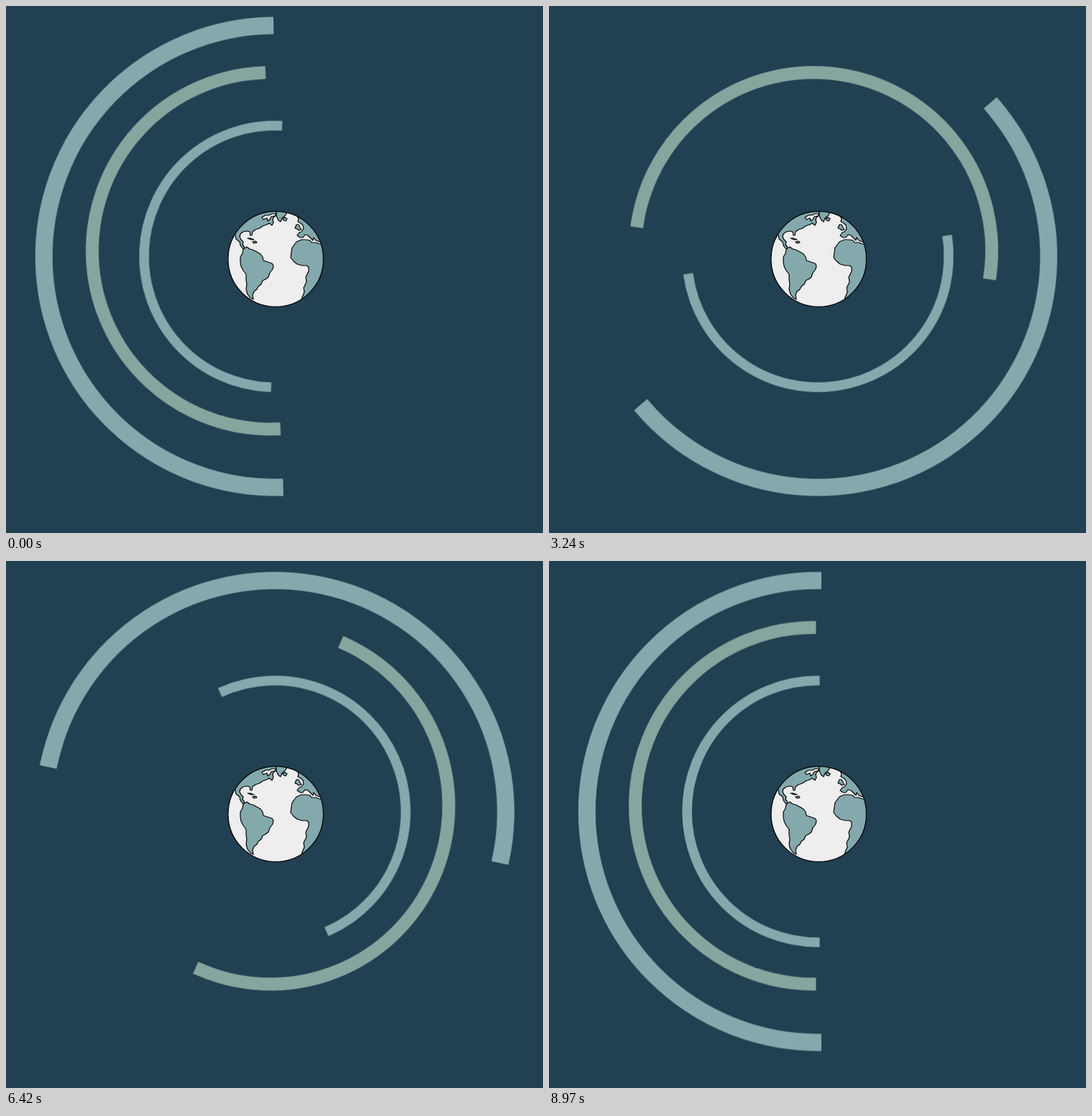
These frames come from a looping animation (747 by 733 pixels, 9 s). An HTML page:

```html
<!DOCTYPE html>
<html lang="en">
<head>
<meta charset="utf-8">
<title>Globe with orbiting arcs</title>
<style>
  html, body { margin: 0; width: 100%; height: 100%; overflow: hidden; background: #214051; }
  svg { display: block; width: 747px; height: 733px; }
  .arc { fill: none; stroke: #83a9ad; transform-origin: 0 0; }
  /* 30 ms ticks; the delay puts the first tick at time zero */
  .outer { stroke-width: 24; animation: ccw 9s steps(300) -32ms infinite; }
  .middle { stroke: #86a59f; stroke-width: 18; animation: ccw2 9s steps(300) -32ms infinite; }
  .inner { stroke-width: 13.5; animation: cw2 9s steps(300) -32ms infinite; }
  @keyframes ccw { to { transform: rotate(-360deg); } }
  @keyframes ccw2 { to { transform: rotate(-720deg); } }
  @keyframes cw2 { to { transform: rotate(720deg); } }
  .sea { fill: #eee; }
  .land { fill: #83a9ad; stroke: #000; stroke-width: 1.2; stroke-linejoin: round; }
  .lake { fill: #eee; }
  .rim { fill: none; stroke: #000; stroke-width: 1.3; }
</style>
</head>
<body>
<svg viewBox="0 0 747 733">
  <defs>
    <clipPath id="disc"><circle cx="375.2" cy="352" r="66.3"/></clipPath>
  </defs>

  <g transform="translate(373.9 348.4)">
    <path class="arc outer" d="M5-321.2H0A321.2 321.2 0 0 0 0 321.2H5"/>
  </g>
  <g transform="translate(367.9 340.5)">
    <path class="arc middle" d="M3.5-248H0A248 248 0 0 0 0 248H3.5"/>
  </g>
  <g transform="translate(374 348.3)">
    <path class="arc inner" d="M2.5-182H0A182 182 0 0 0 0 182H2.5"/>
  </g>

  <circle class="sea" cx="375.2" cy="352" r="66.3"/>
  <g class="land" clip-path="url(#disc)">
    <!-- North and Central America -->
    <path d="M376 280L340 284L312 312L319 318L320 324L325 328L326 333L329 337L332 338L331 334L329 332L330 328L327 325L325 321L326 317L330 314L335 313L339 314L340 319L342 319L343 314L347 311L353 309L357 306L363 304L366 302L370 305L372 301L371 297L372 294L376 291Z"/>
    <path class="lake" d="M356 294L361 291L366 291L370 289L376 289L374 292L369 293L367 297L364 299L363 295L358 297Z"/>
    <!-- Greenland and Iceland -->
    <path d="M376 282L376 292L379 298L382 300L384 295L388 292L391 287L391 282Z"/>
    <path d="M385 296L388 294L391 296L389 299L386 298Z"/>
    <!-- Caribbean islands -->
    <path d="M336 323L340 323L345 325L341 325Z"/>
    <path d="M343 328L347 327L349 329L345 330Z"/>
    <!-- South America -->
    <path d="M330 338L335 335L339 338L343 339L349 342L354 345L357 349L358 354L364 356L370 358L372 361L371 366L367 371L365 377L361 380L357 382L355 387L351 390L349 394L345 397L343 402L344 408L340 406L336 401L334 394L335 387L334 381L334 373L330 368L327 362L326 356L326 349L329 344Z"/>
    <!-- Europe -->
    <path d="M404 290L407 296L406 300L410 302L413 305L414 310L411 314L408 315L405 319L409 322L413 322L416 318L420 319L424 323L427 326L428 322L431 326L436 328L446 330L440 300Z"/>
    <path d="M404 304L407 304L409 308L411 311L407 312L405 310L402 309Z"/>
    <!-- Africa -->
    <path d="M404 328L411 325L417 325L423 326L425 329L431 329L436 331L446 332L446 380L411 410L412 405L415 398L414 392L418 384L417 377L421 369L421 363L418 361L412 361L405 359L400 355L396 350L397 342L398 336Z"/>
  </g>
  <circle class="rim" cx="375.2" cy="352" r="66.3"/>
</svg>
</body>
</html>
```
